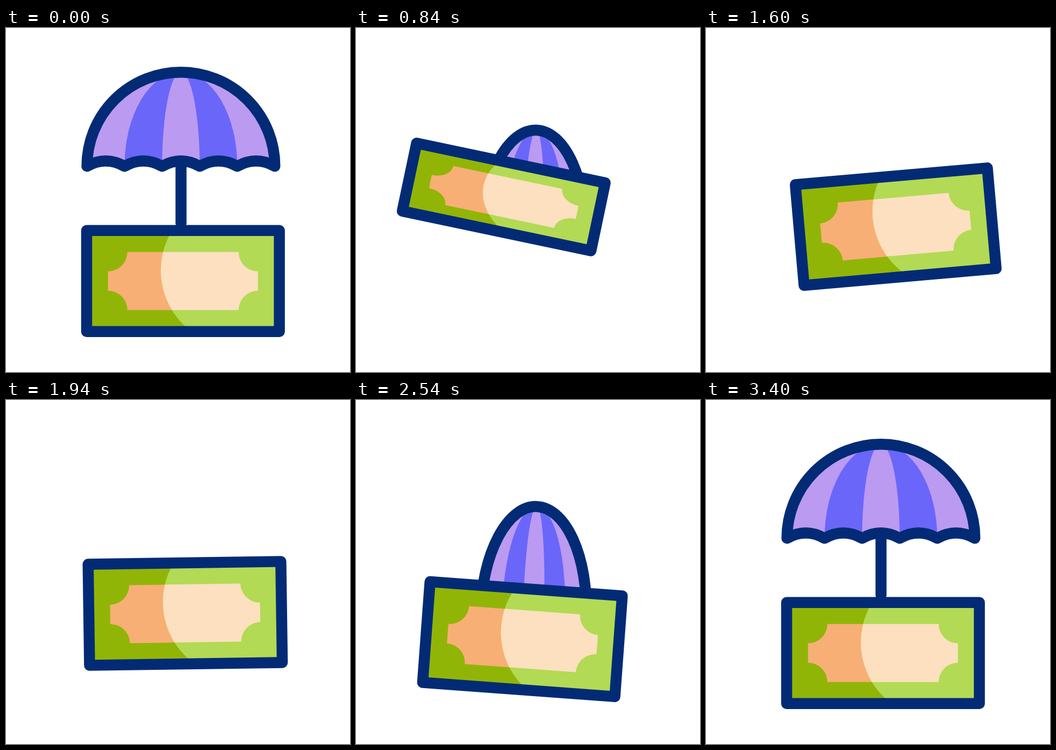
An HTML page with a canvas that plays this animation: 640x640 px, repeating every 3620 ms.

```html
<!DOCTYPE html>
<html lang="en">
<head>
<meta charset="utf-8">
<title>Umbrella and banknote</title>
<style>
  html, body { margin: 0; width: 100%; height: 100%; overflow: hidden; background: #fff; }
  canvas { display: block; width: 100vmin; height: 100vmin; }
</style>
</head>
<body>
<canvas id="stage" width="640" height="640"></canvas>
<script>
const ctx = document.getElementById('stage').getContext('2d');
const LOOP = 3620;
const NAVY = '#032b75', PURPLE = '#bb9af2', BLUE = '#6a66f9';
const GREEN = '#91b507', LIME = '#b2da54', ORANGE = '#f7af75', CREAM = '#fce0bf';

const cubic = (a, b, t) => 3 * a * t * (1 - t) ** 2 + 3 * b * t * t * (1 - t) + t ** 3;

function bezier(x1, y1, x2, y2) {
  return u => {
    let lo = 0, hi = 1;
    for (let i = 0; i < 22; i++) {
      const mid = (lo + hi) / 2;
      if (cubic(x1, x2, mid) < u) lo = mid; else hi = mid;
    }
    return cubic(y1, y2, lo);
  };
}

const linear = u => u;
const smooth = bezier(1 / 3, 0, 2 / 3, 1);
const soft = bezier(1 / 3, .15, 2 / 3, .85);
const mild = bezier(1 / 3, .25, 2 / 3, .75);
const settle = bezier(.15, 0, .69, 1);
const speedUp = bezier(1 / 3, .2, 2 / 3, .64);
const slowDown = bezier(1 / 3, .6, 2 / 3, 1);

// Each key is [time, value, easing towards this key].
function track(...keys) {
  return time => {
    const i = keys.findIndex(key => key[0] > time);
    if (i < 0) return keys[keys.length - 1][1];
    const [t0, from] = keys[i - 1], [t1, to, ease] = keys[i];
    return from + (to - from) * ease((time - t0) / (t1 - t0));
  };
}

const billTrack = (a, b, c, d) =>
  track([0, a], [800, b, smooth], [1600, c, smooth], [2400, d, mild], [3200, a, settle]);
const umbrellaTrack = (open, closed, hidden) =>
  track([0, open], [400, closed, smooth], [1200, hidden, soft],
        [2200, hidden, linear], [3000, closed, soft], [3400, open, smooth]);

const bill = {
  x: billTrack(329.3, 274.3, 353, 306),
  y: track([0, 470.8], [800, 312.5, smooth], [1600, 369.5, speedUp],
           [2400, 434, linear], [3200, 470.8, slowDown]),
  angle: billTrack(0, 12, -5, 5),
  squash: track([0, 1], [800, .685, smooth], [1600, 1, smooth])
};
const umbrella = {
  x: umbrellaTrack(325.4, 325.4, 343),
  top: umbrellaTrack(82.2, 26, 316),
  radius: umbrellaTrack(174.8, 84, 108),
  height: umbrellaTrack(175, 235, 175),
  angle: umbrellaTrack(0, 0, 2.8)
};

function place(x, y, degrees) {
  ctx.translate(x, y);
  ctx.rotate(degrees * Math.PI / 180);
}

function fillShape(color, path) {
  ctx.fillStyle = color;
  ctx.beginPath();
  path();
  ctx.fill();
}

function drawUmbrella(time) {
  const w = umbrella.radius(time), h = umbrella.height(time);
  const dome = rx => ctx.ellipse(0, h, rx, h, 0, Math.PI, 2 * Math.PI);
  const canopy = () => {
    dome(w);
    for (let i = 4; i >= 0; i--) {
      const tip = (i * .4 - 1) * w;
      ctx.quadraticCurveTo(tip + w * .2, h * .888, tip, h);
    }
    ctx.closePath();
  };

  ctx.save();
  ctx.beginPath();
  ctx.rect(0, 0, 640, bill.y(time));
  ctx.clip();
  place(umbrella.x(time), umbrella.top(time), umbrella.angle(time));

  ctx.beginPath();
  ctx.moveTo(.2, h);
  ctx.lineTo(.2, h + 106);
  ctx.stroke();

  ctx.save();
  ctx.beginPath();
  canopy();
  ctx.clip();
  fillShape(PURPLE, () => dome(w + 1));
  fillShape(BLUE, () => dome(w * .6));
  fillShape(PURPLE, () => dome(w * .2));
  ctx.restore();

  ctx.beginPath();
  canopy();
  ctx.stroke();
  ctx.restore();
}

function billPanel() {
  ctx.rect(-179.3, -94, 358.6, 188);
}

function ticket() {
  const a = 139.5, b = 54, r = 36, q = Math.PI / 2;
  ctx.arc(-a, -b, r, q, 0, true);
  ctx.arc(a, -b, r, 2 * q, q, true);
  ctx.arc(a, b, r, 3 * q, 2 * q, true);
  ctx.arc(-a, b, r, 4 * q, 3 * q, true);
}

function drawBill(time) {
  const squash = bill.squash(time);
  ctx.save();
  place(bill.x(time), bill.y(time), bill.angle(time));

  ctx.save();
  ctx.scale(1, squash);
  fillShape(GREEN, billPanel);
  fillShape(ORANGE, ticket);
  ctx.beginPath();
  ctx.arc(100.7, -19.8, 142, 0, 2 * Math.PI);
  ctx.clip();
  fillShape(LIME, billPanel);
  fillShape(CREAM, ticket);
  ctx.restore();

  ctx.strokeRect(-179.3, -94 * squash, 358.6, 188 * squash);
  ctx.restore();
}

function draw(time) {
  ctx.fillStyle = '#fff';
  ctx.fillRect(0, 0, 640, 640);
  ctx.strokeStyle = NAVY;
  ctx.lineWidth = 20.5;
  ctx.lineJoin = ctx.lineCap = 'round';
  if (time < 1200 || time > 2200) drawUmbrella(time);
  drawBill(time);
}

const start = performance.now();
function tick() {
  draw((performance.now() - start) % LOOP);
  requestAnimationFrame(tick);
}
tick();
</script>
</body>
</html>
```
